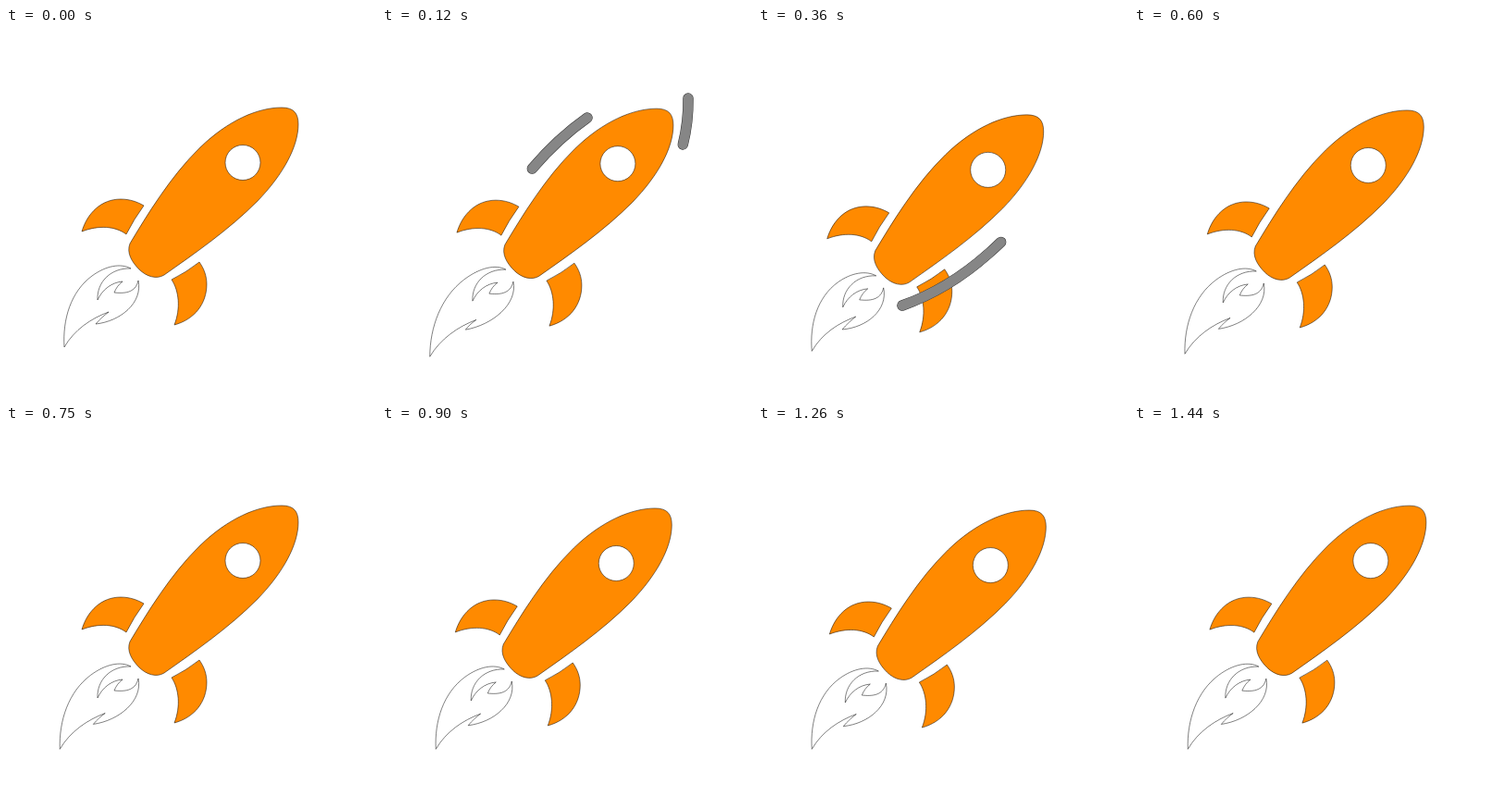
Write an HTML page that moves like this. It is 400 px wide and 400 px high and loops after 1470 ms.

```html
<!DOCTYPE html>
<html lang="en">
<head>
<meta charset="utf-8">
<title>Rocket</title>
<style>
  html, body { margin: 0; width: 100%; height: 100%; overflow: hidden; background: #fff; }
  svg { display: block; width: 100vw; height: 100vh; }
  .hull { fill: #ff8a00; }
  .hollow { fill: #fff; }
  .hull, .hollow { stroke: #000; stroke-width: .5; }
  .streak path { fill: none; stroke-linecap: round; }
  .edge { stroke: #333; stroke-width: 11.4; }
  .core { stroke: #868686; stroke-width: 10.4; }
</style>
</head>
<body>
<svg viewBox="0 0 400 400">
  <path id="flame" class="hollow"/>
  <g id="rocket">
    <path class="hull" d="M134 233C152 203 178 160 210 129C240 100 272 86 298 86C311 86 316 92 316 104C316 128 300 158 272 187C240 219 205 243 171 267C163 272 152 269 144 261C136 253 130 243 134 233Z"/>
    <circle class="hollow" cx="256" cy="145.5" r="19"/>
    <path class="hull" d="M82 220C88 200 103 185 124 185C134 185 142 188 149 192Q138 207 130 223C118 214 100 213 82 220Z"/>
    <path class="hull" d="M209 253C214 260 217 268 217 277C217 298 204 315 182 321C189 303 187 284 179 272Q195 264 209 253Z"/>
  </g>
  <g id="left" class="streak"></g>
  <g id="right" class="streak"></g>
</svg>
<script>
const STEP = 30, LOOP = 1470, SPEED = 1.23;
const $ = id => document.getElementById(id);

// x, y, share of the tip's own movement
const flamePoints = [
  [135, 260, 0],
  [124, 254, 0], [108, 257, .1], [93, 268, .3],
  [70, 285, .5], [61, 315, .8], [63, 345, 1],
  [74, 326, .95], [92, 314, .85], [111, 307, .8],
  [107, 310, .75], [101, 315, .6], [97, 320, .55],
  [124, 317, .3], [148, 297, 0], [143, 273, 0],
  [140, 287, 0], [127, 287, 0], [117, 286, 0],
  [119, 281, 0], [122, 277, 0], [126, 274, 0],
  [114, 275, 0], [104, 283, 0], [99, 294, 0],
  [98, 275, 0], [113, 259, 0], [135, 260, 0]
];

// head and tail are distances along the path at 240 ms
function makeStreak(id, d, tail, head) {
  const paths = ['edge', 'core'].map(name => {
    const p = document.createElementNS('http://www.w3.org/2000/svg', 'path');
    p.setAttribute('class', name);
    p.setAttribute('d', d);
    return $(id).appendChild(p);
  });
  const length = paths[0].getTotalLength();
  return t => {
    const moved = SPEED * (t - 240);
    const from = Math.max(0, tail + moved);
    const to = Math.min(length, head + moved);
    $(id).style.display = to > from ? '' : 'none';
    for (const p of paths) {
      p.setAttribute('stroke-dasharray', `${Math.max(0, to - from)} 2000`);
      p.setAttribute('stroke-dashoffset', -from);
    }
  };
}

const streaks = [
  makeStreak('left', 'M222 97C175 130 135 180 107 237', 58, 229),
  makeStreak('right', 'M331 76C332 140 302 198 249 244C222 268 190 288 156 300', 27, 198)
];

const wave = (t, period) => Math.cos(2 * Math.PI * t / period);

function draw(t) {
  const run = t - STEP;
  const sway = run < 0 ? 0 : (1 - wave(run, 720)) / 2;
  const flick = run < 0 ? 0 : 7.7 + 3.6 * wave(run - 75, 180);
  const bx = -7.4 * sway, by = 8 * sway;
  const tx = -1.04 * flick, ty = .95 * flick;

  $('rocket').setAttribute('transform', `translate(${bx} ${by})`);
  const pts = flamePoints.map(([x, y, w]) =>
    `${x + bx + w * (tx - bx)} ${y + by + w * (ty - by)}`);
  $('flame').setAttribute('d', `M${pts[0]}C${pts.slice(1).join(' ')}Z`);
  streaks.forEach(s => s(t));
}

const start = performance.now();
function tick() {
  const t = (performance.now() - start) % LOOP;
  draw(Math.floor(t / STEP) * STEP);
  requestAnimationFrame(tick);
}
draw(0);
requestAnimationFrame(tick);
</script>
</body>
</html>
```
